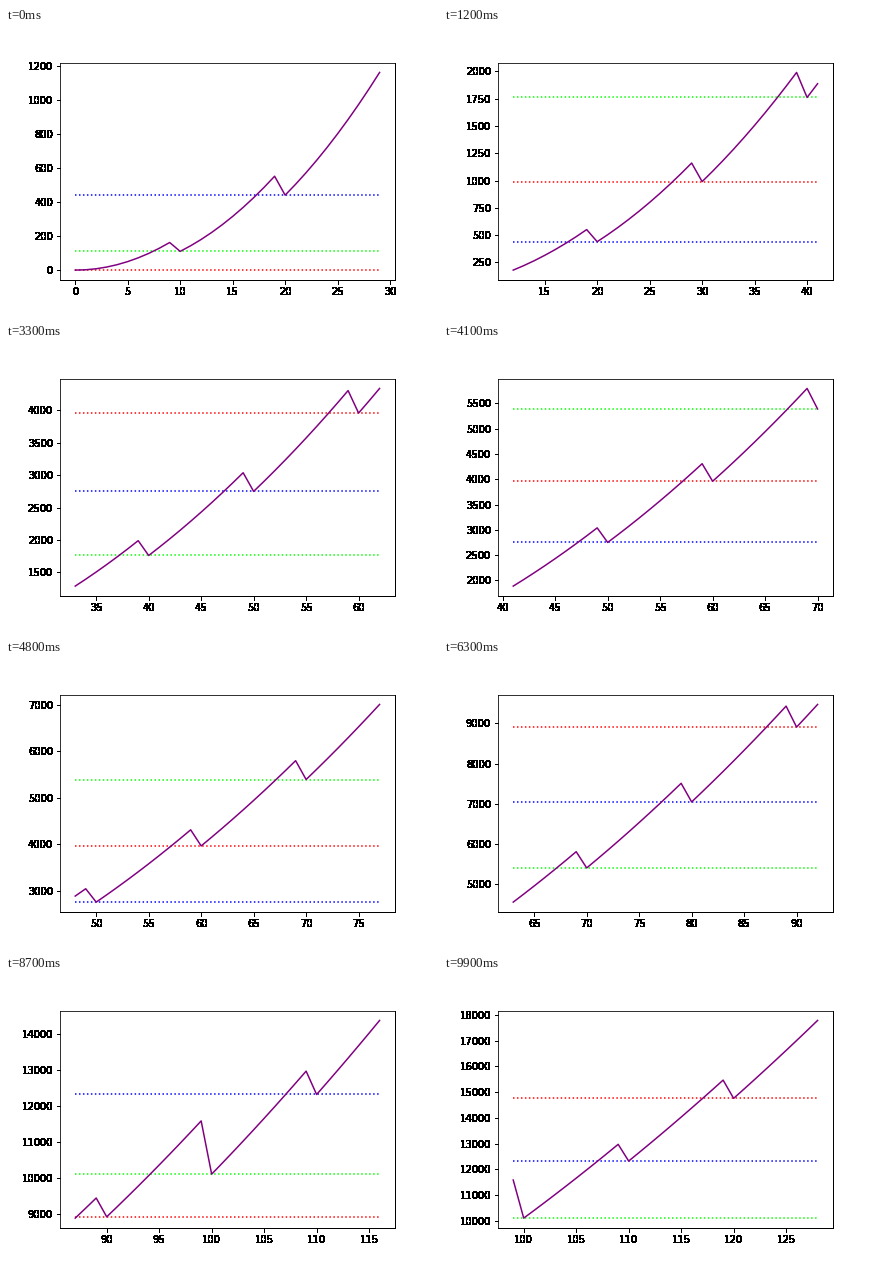
Recreate the animation shown at these times as a matplotlib script. Size 432 px wide and 288 px high, loop 10 s.

```python
import matplotlib.pyplot as plt
import numpy as np
from matplotlib.animation import FuncAnimation

FRAMES = 100
SPAN = 30
COLORS = ["red", "lime", "blue"]


def value(n):
    """n times the sum of n and its decimal digits."""
    return n * (n + sum(map(int, str(n))))


def solid(img, dpi):
    """Turn every touched pixel fully opaque, for hard-edged labels and ticks."""
    img[..., 3] = np.where(img[..., 3] > 0, 1.0, 0.0)
    return img, 0, 0


fig = plt.figure(figsize=(6, 4), dpi=72, facecolor="white")
fig.subplots_adjust(left=0.125, right=0.9, bottom=0.125, top=0.88)
ax = fig.add_subplot()


def update(start):
    ax.clear()
    for part in (ax.xaxis, ax.yaxis, ax.spines["right"], ax.spines["bottom"]):
        part.set_agg_filter(solid)

    xs = range(start, start + SPAN)
    for n in xs:
        if n % 10 == 0:
            ax.plot([xs[0], xs[-1]], [value(n)] * 2, ":",
                    color=COLORS[n // 10 % 3])
    ax.plot(xs, [value(n) for n in xs], color="purple")


anim = FuncAnimation(fig, update, frames=FRAMES, interval=100,
                     repeat=True, repeat_delay=0)
plt.show()
```
